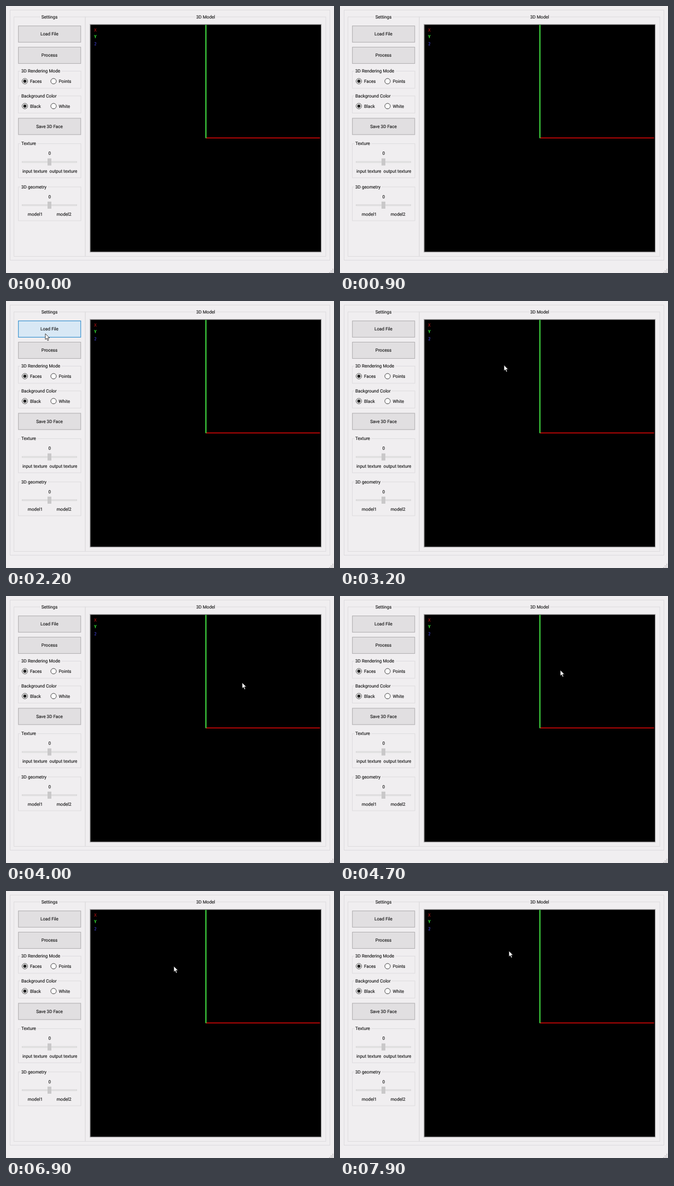
These frames come from a looping animation (600x490 px, 8000 ms). An HTML page:

```html
<!DOCTYPE html>
<html lang="en">
<head>
<meta charset="utf-8">
<title>3D Model</title>
<style>
html, body { margin: 0; width: 100%; height: 100%; overflow: hidden; background: #f0eef0; }
svg { display: block; width: 600px; height: 490px; }
text { font: 8.15px Roboto, "Noto Sans", sans-serif; fill: #111; stroke: #111; stroke-width: .12; text-rendering: geometricPrecision; }
.mono { font: 8px "DejaVu Sans Mono", monospace; stroke: none; }
.group { fill: none; stroke: #dddbde; }
.button { fill: #e1dfe1; stroke: #b3b1b3; stroke-width: 1.1; }
.button.hover { fill: #d8e8f5; stroke: #2f8ccc; }
</style>
</head>
<body>
<svg id="stage" viewBox="0 0 600 490"></svg>
<script>
const NS = "http://www.w3.org/2000/svg";
const stage = document.getElementById("stage");
const LOOP = 8000, TICK = 100;

function add(tag, attrs, content) {
  const node = document.createElementNS(NS, tag);
  for (const key in attrs) node.setAttribute(key, attrs[key]);
  if (content) node.textContent = content;
  stage.appendChild(node);
  return node;
}

const rect = (x, y, width, height, attrs) => add("rect", { x, y, width, height, ...attrs });
const label = (text, x, y, anchor = "start") => add("text", { x, y: y + 2.5, "text-anchor": anchor }, text);

function group(title, x, y, w, h, center) {
  rect(x, y, w, h, { class: "group" });
  const tag = label(title, center || x + 5.5, y, center ? "middle" : "start");
  const box = tag.getBBox();
  const gap = rect(box.x - 2, y - 3, box.width + 4, 6, { fill: "#f0eef0" });
  stage.insertBefore(gap, tag);
}

function button(text, y, h = 30) {
  const node = rect(22.7, y, 114, h, { class: "button" });
  label(text, 79.5, y + h / 2, "middle");
  return { node, top: y, bottom: y + h };
}

function radio(text, x, y, checked) {
  add("circle", { cx: x, cy: y, r: 5, fill: "#fff", stroke: "#333", "stroke-width": .9 });
  if (checked) add("circle", { cx: x, cy: y, r: 3, fill: "#222" });
  label(text, x + 9.5, y + .3);
}

function slider(y) {
  label("0", 79.7, y - 15.5, "middle");
  rect(29.5, y - 1, 100, 2, { fill: "#e9e8e9", stroke: "#d3d2d3", "stroke-width": .8 });
  rect(76, y - 6.5, 7, 13, { fill: "#c9c8c9" });
}

rect(0, 0, 600, 490, { fill: "#f0eef0" });
rect(7.5, 7.5, 585, 459, { class: "group" });
group("Settings", 14.5, 20, 130.5, 439.5, 79.5);
group("3D Model", 145, 20, 440, 439.5, 365.3);

const buttons = [button("Load File", 36.5), button("Process", 75.5), button("Save 3D Face", 206)];

group("3D Rendering Mode", 22.5, 119.5, 114.5, 31.5);
radio("Faces", 34.5, 138, true);
radio("Points", 87, 138);
group("Background Color", 22.5, 165, 114.5, 31.5);
radio("Black", 34.5, 183.7, true);
radio("White", 87, 183.7);

group("Texture", 22.5, 252.7, 114.5, 62.5);
slider(286.2);
label("input texture", 30, 303.5);
label("output texture", 79.6, 303.5);
group("3D geometry", 22.5, 332, 114.5, 62);
slider(365.5);
label("model1", 53.4, 382.5, "middle");
label("model2", 106, 382.5, "middle");

// Viewport
rect(153, 33, 425, 420, { fill: "#fbfafb" });
rect(153, 33, 424.3, 419.3, { fill: "#b4b2b4" });
rect(154, 34, 422.6, 417.6, { fill: "#8c8a8c" });
rect(154.6, 34.6, 421.4, 416.2, { fill: "#000" });
rect(366, 241.2, 208.5, 1.9, { fill: "#b80606" });
rect(364.7, 34.6, 1.9, 207.9, { fill: "#48f048" });
add("text", { x: 161, y: 46.7, class: "mono", style: "fill:#c41616" }, "X");
add("text", { x: 161, y: 59.4, class: "mono", style: "fill:#35e035;font-weight:bold" }, "Y");
add("path", { d: "M161.8 67H164.5V69L162 71.8H164.8", fill: "none", stroke: "#3c3cc8", "stroke-width": .9 });

// Size grip
for (let row = 0; row < 3; row++)
  for (let col = 2 - row; col < 3; col++)
    rect(591 + col * 3, 482.5 + row * 3, 1.7, 1.7, { fill: "#b9b7b9" });

const cursor = add("path", {
  d: "M0 0V10.6L2.4 8.4L4.2 12.6L6 11.8L4.2 7.8H7.6Z",
  fill: "#fff", stroke: "#111", "stroke-width": .8, "stroke-linejoin": "round"
});

// Pointer path: time, x, y
const route = [
  [1500, 5, 84], [1800, 42, 67], [2200, 72, 60], [2400, 72, 60],
  [2800, 140, 76], [3300, 340, 128], [3700, 405, 150], [4000, 432, 159],
  [4200, 449, 160], [4400, 502, 152], [4700, 403, 136], [5000, 403, 136],
  [5600, 314, 121], [6000, 308, 130], [6900, 307, 138], [7900, 309, 110]
];

function pointerAt(t) {
  if (t < route[0][0]) return null;
  const i = route.findIndex(p => p[0] > t);
  if (i < 0) return route[route.length - 1].slice(1);
  const [t0, x0, y0] = route[i - 1], [t1, x1, y1] = route[i];
  const k = (t - t0) / (t1 - t0);
  return [x0 + (x1 - x0) * k, y0 + (y1 - y0) * k];
}

function render(ms) {
  const t = Math.floor(ms % LOOP / TICK) * TICK;
  const p = pointerAt(t);
  cursor.style.display = p ? "" : "none";
  if (p) cursor.setAttribute("transform", `translate(${p[0].toFixed(1)} ${p[1].toFixed(1)})`);
  for (const b of buttons) {
    const over = p && p[0] >= 22 && p[0] <= 137 && p[1] >= b.top && p[1] <= b.bottom;
    b.node.classList.toggle("hover", !!over);
  }
}

const start = performance.now();
function frame() {
  render(performance.now() - start);
  requestAnimationFrame(frame);
}
frame();
</script>
</body>
</html>
```
